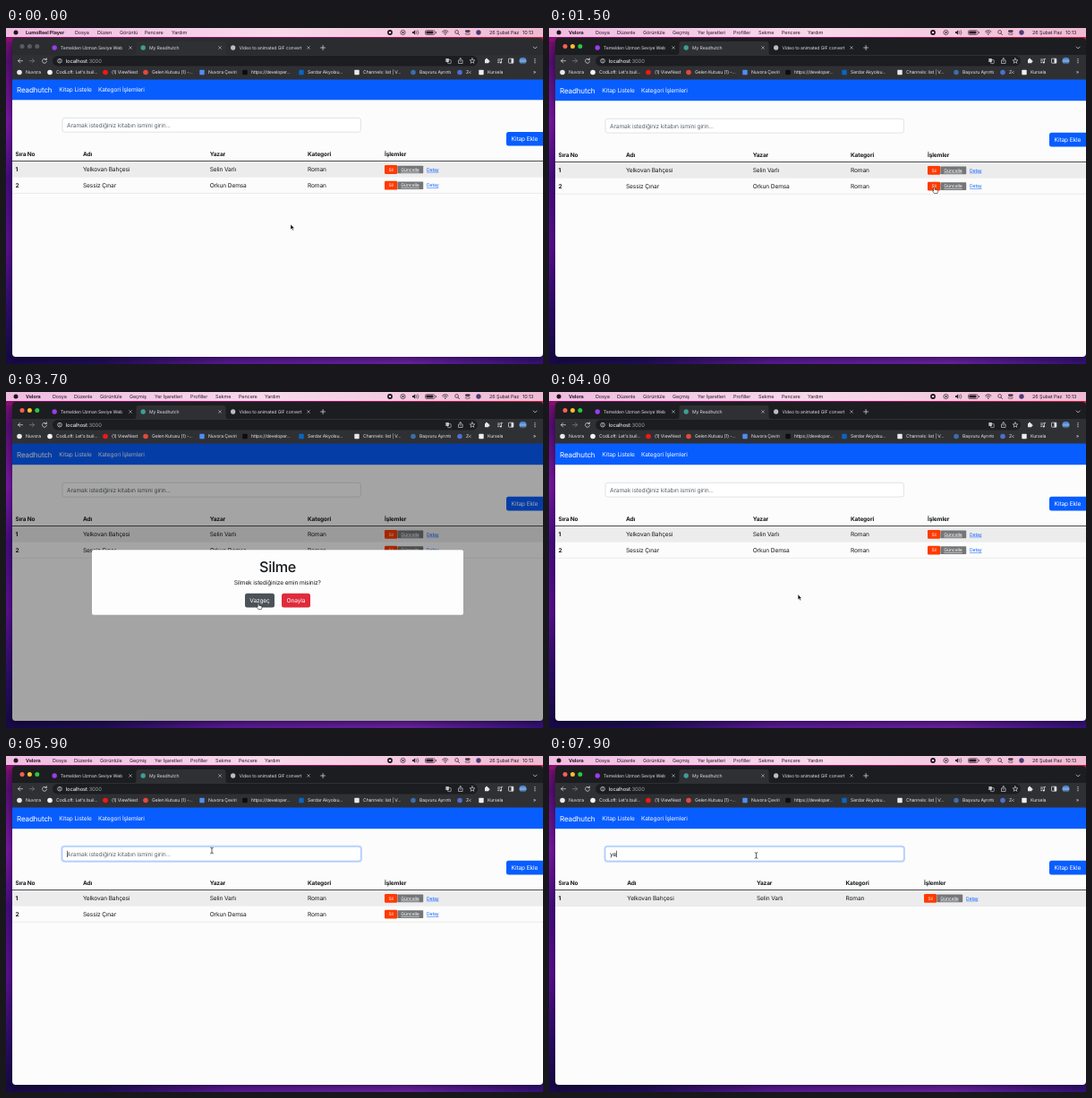
Animation of 600x375 px, one loop 8000 ms. Source, as an HTML page:

```html
<!DOCTYPE html>
<html lang="tr">
<head>
<meta charset="utf-8">
<title>Kitap listesi</title>
<style>
  html, body { margin: 0; width: 100%; height: 100%; overflow: hidden; background: #1a0a45; }
  svg { display: block; width: 600px; height: 375px; }
  text { font-family: Inter, Roboto, sans-serif; letter-spacing: -.02em; text-rendering: geometricPrecision; white-space: pre; }
  .off { display: none; }
  .line { fill: none; stroke-linecap: round; stroke-linejoin: round; }
  .shadow { filter: blur(4px); }
</style>
</head>
<body>
<svg id="stage" viewBox="0 0 600 375" xmlns="http://www.w3.org/2000/svg"></svg>
<script>
const LOOP = 8000, TICK = 100;
const BLUE = '#085dff', INK = '#16191c', BAR = '#2f3034', STRIP = '#1c1d20', PALE = '#e4e5e8', PLUM = '#2b1c29';

const text = (x, y, s, size, fill = INK, extra = '') =>
  `<text x="${x}" y="${y}" font-size="${size}" fill="${fill}" ${extra}>${s}</text>`;
const rect = (x, y, w, h, fill, r = 0, extra = '') =>
  `<rect x="${x}" y="${y}" width="${w}" height="${h}" rx="${r}" fill="${fill}" ${extra}/>`;
const frame = (x, y, w, h, r, color, width) => rect(x, y, w, h, 'none', r, `stroke="${color}" stroke-width="${width}"`);
const dot = (x, y, r, fill) => `<circle cx="${x}" cy="${y}" r="${r}" fill="${fill}"/>`;
const ring = (x, y, r, color) => `<circle cx="${x}" cy="${y}" r="${r}" fill="none" stroke="${color}" stroke-width=".7"/>`;
const line = (d, color = PALE, w = .7) => `<path class="line" d="${d}" stroke="${color}" stroke-width="${w}"/>`;
const group = (id, body) => `<g id="${id}">${body}</g>`;
const gradient = (id, dir, stops) => `<linearGradient id="${id}" ${dir}>` +
  stops.map(([o, c]) => `<stop offset="${o}" stop-color="${c}"/>`).join('') + '</linearGradient>';
const BOLD = 'font-weight="700"', MID = 'text-anchor="middle"', UNDER = 'text-decoration="underline"';
const DOWN = 'x1="0" y1="0" x2="0" y2="1"';

const defs = `<defs>
  ${gradient('side', DOWN, [[0, '#8a1270'], [.1, '#560f74'], [.28, '#7a18a8'], [.45, '#460c84'],
    [.65, '#5c1096'], [.85, '#2c0c6c'], [1, '#170a44']])}
  ${gradient('floor', '', [[0, '#190a48'], [.18, '#220e5a'], [.42, '#5c1a9a'], [.75, '#6c22a6'], [1, '#35117a']])}
  ${gradient('menu', '', [[0, '#efbce0'], [.5, '#f8d8eb'], [1, '#eebad3']])}
  ${gradient('edge', '', [[0, '#8a1070'], [.6, '#a01468'], [1, '#d0244c']])}
  ${gradient('sky', DOWN, [[0, '#3a6fc4'], [.55, '#7db0e8'], [1, '#24384c']])}
  <clipPath id="window"><rect x="7" y="11" width="593" height="356" rx="4"/></clipPath>
</defs>`;

const wallpaper = rect(0, 0, 600, 375, 'url(#side)') + rect(0, 364, 600, 11, 'url(#floor)') +
  rect(0, 9, 600, 6, 'url(#edge)') + rect(7, 16, 593, 353, 'rgba(0,0,0,.55)', 4, 'class="shadow"');

// Menu bar
const menuItems = list => list.map(([x, s], i) => text(x, 7, s, 5.5, PLUM, i ? '' : BOLD)).join('');
const menuBar = rect(0, 0, 600, 10, 'url(#menu)') + dot(11, 5, 2.5, '#1c141b') +
  group('menuIdle', menuItems([[22, 'LumoReel Player'], [77, 'Dosya'], [102, 'Düzen'], [127, 'Görüntü'],
    [155, 'Pencere'], [185, 'Yardım']])) +
  group('menuBusy', menuItems([[22, 'Velora'], [52, 'Dosya'], [76, 'Düzenle'], [105, 'Görüntüle'], [138, 'Geçmiş'],
    [166, 'Yer İşaretleri'], [206, 'Profiller'], [234, 'Sekme'], [260, 'Pencere'], [289, 'Yardım']])) +
  dot(429, 5, 2.9, '#1c141b') + rect(427.9, 3.9, 2.2, 2.2, '#f9dbec', .3) +
  ring(443.5, 5, 2.6, PLUM) + `<path d="M442.8 3.6l2.2 1.4-2.2 1.4z" fill="${PLUM}"/>` +
  `<path d="M454 4h1.4l1.8-1.7v5.4l-1.8-1.7H454z" fill="${PLUM}"/>` +
  line('M458.5 3.6q1.1 1.4 0 2.8M460 2.5q2.2 2.5 0 5', PLUM, .6) +
  frame(468.5, 2.7, 10.5, 4.8, 1.3, PLUM, .6) + rect(469.4, 3.6, 8, 3, PLUM, .6) + line('M480.4 4.4v1.4', PLUM) +
  line('M487.6 4q3.2-2.8 6.4 0M488.8 5.3q2-1.7 4 0', PLUM, .8) + dot(490.8, 7, .8, PLUM) +
  ring(503.6, 4.5, 1.9, PLUM) + line('M505 6l1.6 1.7', PLUM) +
  rect(513, 2.4, 5.6, 2.2, PLUM, 1.1) + frame(513.3, 5.6, 5, 1.8, .9, PLUM, .5) +
  dot(528, 5, 2.7, '#4c3b78') +
  text(540, 7, '26 Şubat Paz', 5.5, PLUM) + text(577, 7, '10:13', 5.5, PLUM);

// Browser window
const close = x => line(`M${x - 1.4} 20.6l2.8 2.8m0-2.8l-2.8 2.8`, '#c6c8cc', .6);
const tab = (x, color, s, end) => dot(x - 6.8, 22, 2.7, color) + text(x, 23.8, s, 5.1, '#d9dade') + close(end);
const lights = (...colors) => colors.map((c, i) => dot(18 + i * 8.4, 20.5, 2.5, c)).join('');
const tabs = rect(7, 11, 593, 20, STRIP, 0, 'id="strip"') +
  group('lightsIdle', lights('#5b5c60', '#5b5c60', '#5b5c60')) +
  group('lightsBusy', lights('#ff5f57', '#febc2e', '#28c840')) +
  `<path d="M143 30q2.5 0 2.5-3v-9q0-3 3-3h94q3 0 3 3v9q0 3 2.5 3z" fill="${BAR}"/>` +
  tab(61, '#9a3cf0', 'Temelden Uzman Seviye Web', 139) +
  tab(160, '#3d9f93', 'My Readhutch', 239) +
  tab(260.5, '#b9bcc0', 'Video to animated GIF convert', 338) +
  line('M351.6 22h5M354.1 19.5v5') + line('M589.2 21l2 2 2-2');

const badge = { round: (x, c) => dot(x, 49.5, 2.8, c), square: (x, c) => rect(x - 2.7, 46.8, 5.4, 5.4, c, .6) };
const marks = [
  [22, 'Nuvora', '#e8e9ea', 'round'], [56, "CodLoft: Let's buil...", '#f4f4f5', 'round'],
  [118, '(1) ViewNest', '#f01818', 'round'], [163, 'Gelen Kutusu (1) -...', '#e2493c', 'round'],
  [226, 'Nuvora Çeviri', '#4f8df5', 'square'], [274, 'https://developer...', '#0c0c0d', 'square'],
  [337, 'Serdar Akyolsu...', '#0a66c2', 'square'], [399, 'Channels: list | V...', '#e9eae6', 'square'],
  [462, 'Başvuru Ayrıntı', '#3a6ea8', 'round'], [514, 'Z&lt;', '#4d6fd0', 'round'], [538, 'Kursela', '#eceef0', 'square']
].map(([x, s, color, kind]) => badge[kind](x - 7, color) + text(x, 51.4, s, 5.15, PALE)).join('');

const toolbar = rect(7, 30, 593, 27.5, BAR) + rect(52, 31, 475, 11.5, STRIP, 5.7) +
  line('M18.5 36.7h-5m2.2-2.2l-2.2 2.2 2.2 2.2') +
  line('M26.5 36.7h5m-2.2-2.2l2.2 2.2-2.2 2.2', '#85878b') +
  line('M45 35.2a2.5 2.5 0 1 0 .5 2.2M45.4 33.8v1.8h-1.8') +
  ring(60, 36.7, 2.3, PALE) + line('M60 36.5v1.3M60 35.4v.1', PALE, .6) +
  text(66.8, 38.8, 'localhost<tspan fill="#9aa0a6">:3000</tspan>', 5.9, '#fff') +
  rect(491.3, 34, 3.6, 4, '#b8bbc0', .5) + frame(493.6, 35.6, 3.6, 4, .5, '#d4d6da', .6) +
  line('M506.5 36h-1v3.5h4.6V36h-1M507.8 37.5v-3.8m-1.3 1.2l1.3-1.2 1.3 1.2', PALE, .6) +
  line('M521 33.8l.8 2 2.1.1-1.7 1.3.6 2.1-1.8-1.2-1.8 1.2.6-2.1-1.7-1.3 2.1-.1z', PALE, .6) +
  rect(535, 35, 4.3, 4.3, PALE, .6) + dot(537, 34.8, 1.1, PALE) + dot(539.5, 37.2, 1, PALE) +
  line('M549.5 35h3.5M549.5 36.8h2M549.5 38.6h1.5M553.5 38.5v-4h1.2') + dot(552.8, 38.5, 1, PALE) +
  frame(561.5, 34.2, 5.4, 5, .5, PALE, .7) + rect(564.5, 34.2, 2.4, 5, PALE) +
  dot(577.5, 36.7, 4, 'url(#sky)') +
  [34.7, 36.7, 38.7].map(y => dot(591, y, .6, PALE)).join('') +
  marks + text(589, 51.2, '»', 5.5, PALE);

// Book page
const row = (y, n, [book, author], [a, b, c, d], shade) => {
  const base = y + 11.3;
  return rect(7, y, 593, 17.6, shade) + rect(7, y + 17.4, 593, .5, '#d6dadd') +
    text(10.5, base, n, 6.6, INK, BOLD) + text(a, base, book, 6.6) + text(b, base, author, 6.6) + text(c, base, 'Roman', 6.6) +
    rect(d, y + 4.2, 14.2, 9.8, '#ff3a00', 1.2) + text(d + 7, y + 10.8, 'Sil', 4.9, '#fff', MID) +
    rect(d + 14.4, y + 4.8, 28.8, 8.6, '#747678', .6) +
    text(d + 28.5, y + 10.9, 'Güncelle', 5.1, '#fff', MID + ' ' + UNDER) +
    text(d + 47, y + 10.9, 'Detay', 5.1, BLUE, UNDER);
};
const books = [['Yelkovan Bahçesi', 'Selin Varlı'], ['Sessiz Çınar', 'Orkun Demsa']];
const table = (cols, count) =>
  ['Sıra No', 'Adı', 'Yazar', 'Kategori', 'İşlemler']
    .map((s, i) => text(i ? cols[i - 1] : 10.5, 143.5, s, 6.5, INK, BOLD)).join('') +
  books.slice(0, count).map((book, i) => row(149.8 + i * 17.7, i + 1, book, cols, i ? '#fcfcfc' : '#ececec')).join('') +
  rect(7, 149, 593, .9, '#3a3d40');

const page = rect(7, 50, 593, 320, '#fcfcfc') + rect(7, 50, 593, 31.2, BLUE) +
  text(12, 73, 'Readhutch', 8.1, '#fff') +
  text(59.3, 72, 'Kitap Listele', 6.6, '#f3f7ff') + text(103, 72, 'Kategori İşlemleri', 6.6, '#f3f7ff') +
  rect(61.4, 99.7, 336.6, 19, '#c0d8fd', 4, 'id="glow"') +
  rect(63, 101.3, 333.4, 15.8, '#fff', 2.5, 'id="box" stroke-width=".6"') +
  group('hint', text(68, 111.6, 'Aramak istediğiniz kitabın ismini girin...', 6.65, '#5c646b')) +
  text(68, 111.6, '', 6.6, INK, 'id="typed"') +
  rect(68, 105.7, .6, 7.3, '#111', 0, 'id="caret"') +
  rect(559, 116.8, 43, 15.6, BLUE, 2.5) + text(564.6, 127.2, 'Kitap Ekle', 6.6, '#fff') +
  group('full', table([86, 227.7, 337, 423], 2)) +
  group('found', table([87.3, 232, 331.5, 419], 1));

const modal = rect(7, 57, 593, 312, 'rgba(0,0,0,.35)') + rect(96, 176.3, 415, 72.5, '#fdfdfd', 2) +
  text(303.5, 200.7, 'Silme', 16.2, INK, MID + ' font-weight="500"') +
  text(303.3, 215.3, 'Silmek istediğinize emin misiniz?', 6.6, INK, MID) +
  rect(267, 224.7, 33, 15.8, '#626a71', 2.5, 'id="cancel"') + text(283.5, 235, 'Vazgeç', 6.6, '#fff', MID) +
  rect(308, 224.7, 32, 15.8, '#df2b3b', 2.5) + text(324, 235, 'Onayla', 6.6, '#fff', MID);

// Pointer shapes share a hot spot at the group origin
const pointer =
  group('arrow', '<path d="M0 0v6l1.4-1.2 1 2.2 1-.5-1-2h1.8z" fill="#000" stroke="#fff" stroke-width=".5"/>') +
  group('hand', '<path d="M-.7.6Q0-.4.7.6v2.2l2.4.5q1 .3.9 1.3l-.5 2.4h-3.6l-1.9-2.6q.2-.9 1.3-.2z" fill="#fff" stroke="#000" stroke-width=".5"/>') +
  group('beam', line('M-1.4-3.3Q0-3.3 0-2.3V2.3Q0 3.3-1.4 3.3M1.4-3.3Q0-3.3 0-2.3M0 2.3Q0 3.3 1.4 3.3', '#222'));

document.getElementById('stage').innerHTML = defs + wallpaper + menuBar +
  `<g clip-path="url(#window)">${group('page', page)}${group('modal', modal)}${tabs}${toolbar}</g>` +
  group('pointer', pointer);

const el = id => document.getElementById(id);
const show = (id, on) => el(id).classList.toggle('off', !on);
const set = (id, name, value) => el(id).setAttribute(name, value);

// Moments of the clicks, key presses and the search result
const ACTIVE = 1200, OPEN = 2000, SHUT = 3900, FOCUS = 4600, KEY1 = 6500, KEY2 = 6700, FILTER = 7100;
const moves = [[0, 318, 219], [400, 318, 219], [1100, 430.7, 177.5], [2600, 429.5, 177.5],
  [3300, 282, 235.5], [3900, 282, 235.5], [4500, 230, 105.5], [FILTER, 230, 105.5], [7600, 231.5, 111], [LOOP, 231.5, 111]];

function place(t) {
  const i = moves.findIndex(m => t < m[0]);
  const [t0, x0, y0] = moves[i - 1], [t1, x1, y1] = moves[i];
  const u = (t - t0) / (t1 - t0), e = u * u * (3 - 2 * u);
  return [x0 + (x1 - x0) * e, y0 + (y1 - y0) * e];
}
const inside = (x, y, l, t, r, b) => x >= l && x <= r && y >= t && y <= b;

function draw(t) {
  const active = t >= ACTIVE, open = t >= OPEN && t < SHUT, focus = t >= FOCUS;
  show('menuIdle', !active);
  show('menuBusy', active);
  show('lightsIdle', !active);
  show('lightsBusy', active);
  set('strip', 'fill', active ? STRIP : '#2b2c2f');
  set('page', 'transform', `translate(0 ${active ? 0 : -.9})`);
  show('modal', open);
  show('full', t < FILTER);
  show('found', t >= FILTER);

  const typed = t >= KEY2 ? 'ye' : t >= KEY1 ? 'y' : '';
  el('typed').textContent = typed;
  show('hint', !typed);
  show('glow', focus);
  set('box', 'stroke', focus ? '#8db9fb' : '#c9cfd5');
  const since = t - [KEY2, KEY1, FOCUS].find(k => t >= k);
  show('caret', focus && since % 1000 < 500);
  set('caret', 'x', 68 + (typed ? el('typed').getComputedTextLength() + .1 : 0));

  const [x, y] = place(t);
  const onCancel = open && inside(x, y, 267, 224, 300, 241);
  const hand = onCancel || (!open && active && inside(x, y, 423, 172, 466, 182));
  const beam = !open && inside(x, y, 63, 101, 397, 118);
  set('cancel', 'fill', onCancel ? '#4b5258' : '#626a71');
  show('hand', hand);
  show('beam', beam);
  show('arrow', !hand && !beam);
  show('pointer', t < KEY1 || t > FILTER);
  set('pointer', 'transform', `translate(${x.toFixed(2)} ${y.toFixed(2)})`);
}

const start = performance.now();
function loop() {
  const t = (performance.now() - start) % LOOP;
  draw(Math.floor(t / TICK) * TICK);
  requestAnimationFrame(loop);
}
draw(0);
requestAnimationFrame(loop);
</script>
</body>
</html>
```
